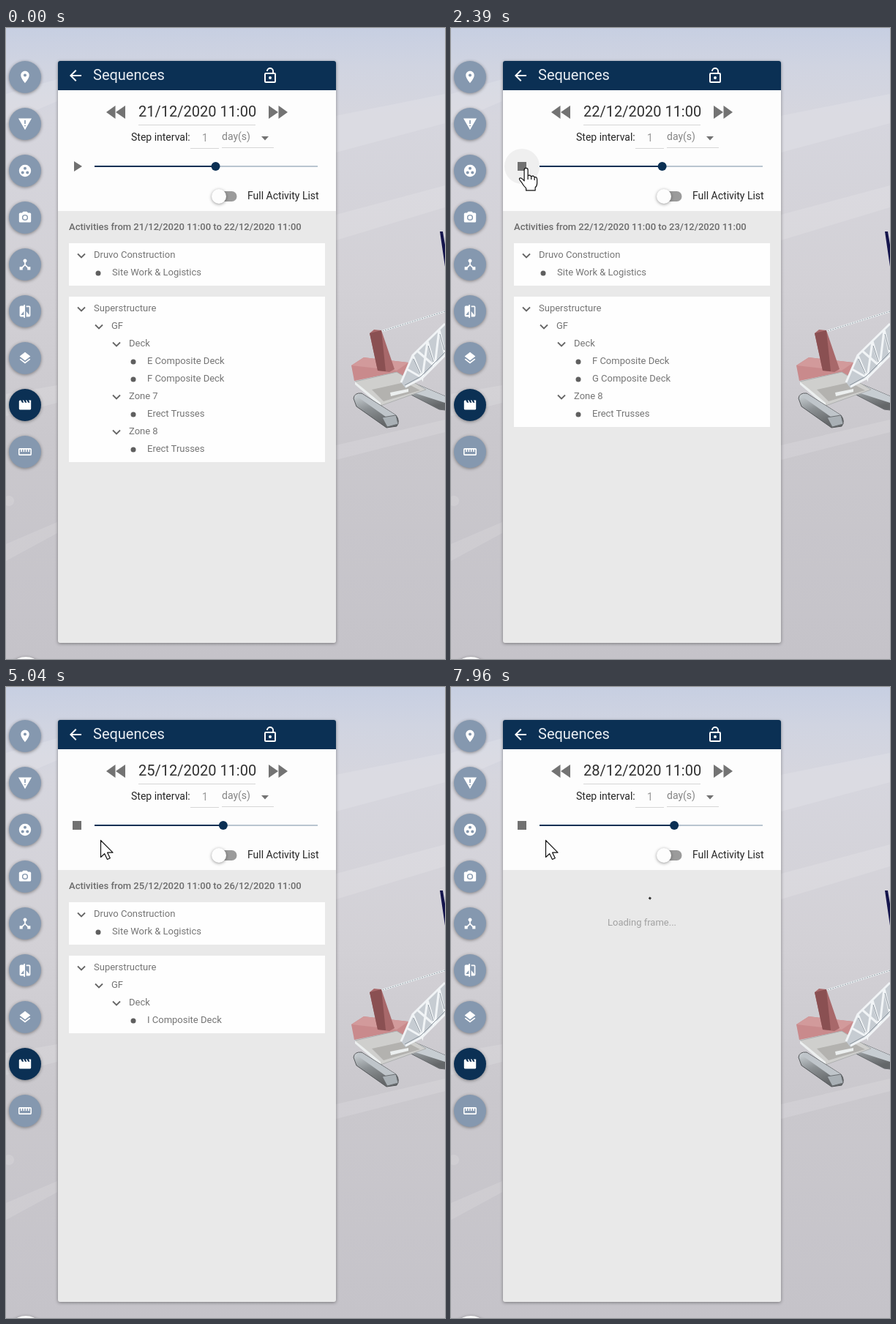
Animation, 600 px wide and 862 px high, one loop 8000 ms. Source, as an HTML page:

```html
<!DOCTYPE html>
<html lang="en">
<head>
<meta charset="utf-8">
<title>Sequences</title>
<style>
  html, body { margin: 0; width: 100%; height: 100%; overflow: hidden; }
  svg { display: block; width: 100vw; height: 100vh; font-family: Roboto, Arial, sans-serif; }
  .lift { filter: drop-shadow(0 1px 2px rgba(0, 0, 0, .4)); }
</style>
</head>
<body>
<svg viewBox="0 0 600 862">
  <defs>
    <linearGradient id="sky" x2="0" y2="1">
      <stop offset="0" stop-color="#c7cfe2"/>
      <stop offset=".06" stop-color="#d0d4e1"/>
      <stop offset=".14" stop-color="#d6d6de"/>
      <stop offset=".4" stop-color="#d3d1d6"/>
      <stop offset=".65" stop-color="#cac8cd"/>
      <stop offset="1" stop-color="#c5c3c9"/>
    </linearGradient>
    <linearGradient id="track" x2=".4" y2="1">
      <stop offset="0" stop-color="#d3d9dd"/>
      <stop offset=".5" stop-color="#8b9093"/>
      <stop offset="1" stop-color="#646769"/>
    </linearGradient>
  </defs>
  <rect width="600" height="862" fill="url(#sky)"/>
  <g fill="#fff" opacity=".13">
    <path d="M0 90L70 70V100L0 130zM0 500L70 488V512L0 530zM0 705L70 675V690L0 728z"/>
    <path d="M451 120L600 90V130L451 170zM451 255L600 215V245L451 290zM451 570L600 535V552L451 590z"/>
    <circle cx="4" cy="646" r="7"/>
  </g>

  <!-- crane -->
  <path d="M593 278h4l3 18v30z" fill="#14144c"/>
  <path d="M508 416L600 387" stroke="#eef2f4" stroke-width="2.2"/>
  <path d="M508 416L600 387" stroke="#8f9ca4" stroke-dasharray="2 1.5"/>
  <path d="M472 461L489 450 550 457 548 477 520 473 476 482z" fill="#c98a8c"/>
  <path d="M472 461L489 450 550 457 534 468z" fill="#d29a9b"/>
  <path d="M497 417L503 412 513 413 531 466 524 470 508 468z" fill="#a8686a"/>
  <path d="M497 417L513 413 519 469 508 468z" fill="#8a5052"/>
  <path d="M546 497L560 486 600 503V522L592 521z" fill="url(#track)" stroke="#66696c"/>
  <path d="M547 495L560 486 600 503V512z" fill="#c7cdd2"/>
  <path d="M477 483L534 470 574 494 512 516z" fill="#cfcfcd" stroke="#aeb0b0"/>
  <path d="M500 494L545 484 566 495 516 510z" fill="#b3b2af"/>
  <path d="M477 483L512 512V517L477 487zM525 498L550 493V497L526 503z" fill="#ecefef"/>
  <path d="M475 506Q476 498 486 499L533 529Q539 537 534 544L520 546 479 517z" fill="url(#track)" stroke="#55585b"/>
  <path d="M478 502L487 500 533 529 523 534z" fill="#bfc5ca"/>
  <path d="M514 532L533 529 536 541 521 545z" fill="#a9b0b5" stroke="#6b6f72"/>
  <path d="M540 484L556 447 600 404V448L569 479 546 492z" fill="#c6ccd2"/>
  <path d="M540 484L556 447 600 404M546 490L569 478 600 447M556 447L569 478 576 428 586 462 592 412 600 446M548 466L569 478M562 441L586 462" fill="none" stroke="#f1f4f6" stroke-width="3"/>
  <path d="M557 452L566 472M577 434L584 456M593 418L599 440M545 488L567 476 600 443" fill="none" stroke="#8b959e"/>

  <g id="tools"></g>
  <circle class="lift" cx="27" cy="887" r="28" fill="#fafafa"/>

  <!-- panel -->
  <g class="lift">
    <rect x="71" y="45" width="380" height="795" rx="3" fill="#e9e9e9"/>
  </g>
  <path d="M71 85V48q0-3 3-3H448q3 0 3 3V85z" fill="#0b3054"/>
  <path d="M71 85H451V250H71z" fill="#fdfdfd"/>
  <g id="head" fill="#fff"></g>
  <path d="M137 115L149.500 106V124zM150 115L163 106V124zM385 115L372.500 106V124zM372 115L359 106V124zM349 148H359L354 153.500z" fill="#737373"/>
  <path d="M181 132.500H341M252 164.500H291M295 163.500H366" stroke="#d6d6d6"/>
  <g id="labels"></g>
  <rect x="284" y="223" width="31.500" height="14" rx="7" fill="#9b9b9b"/>
  <circle class="lift" cx="291" cy="230" r="10" fill="#fdfdfd"/>
  <path d="M121 189H426" stroke="#b9c5d0" stroke-width="2"/>
  <path id="done" stroke="#0b3054" stroke-width="2"/>
  <circle id="thumb" cy="189" r="6" fill="#0b3054"/>
  <circle id="ripple" cx="97" cy="189" fill="#e6e6e6"/>
  <path id="play" fill="#717171"/>
  <g id="list"></g>
  <g id="wait">
    <text x="214" y="326" font-size="13" fill="#a2a2a2">Loading frame...</text>
    <rect id="spin" x="273" width="3" fill="#333"/>
  </g>
  <g id="mouse" fill="#fff" stroke="#111" stroke-width="1.200" stroke-linejoin="round">
    <path id="arrow" d="M.5 .5V23.500L5.700 18.700 9.500 26.500 13.300 24.700 9.600 17.200H17z"/>
    <path id="hand" d="M-2.500 17V2Q-2.500 -.5 0 -.5T2.500 2V10Q5 8 7 11 10 9 11.500 12 15 11 15 15V20Q15 24 12.500 26V30H0V27Q-4 23-6 19-10 15-9 13.500-7 11.500-2.500 17zM2.500 10V15M7 11V15M11.500 12V16"/>
  </g>
</svg>
<script>
const $ = id => document.getElementById(id);
const text = (x, y, size, fill, str, weight = 400) =>
  `<text x="${x}" y="${y}" font-size="${size}" fill="${fill}" font-weight="${weight}">${str}</text>`;
const icon = (x, y, scale, d) =>
  `<path transform="translate(${x} ${y}) scale(${scale}) translate(-12 -12)" fill-rule="evenodd" d="${d}"/>`;
const dot = (x, y, r) => `M${x - r} ${y}a${r} ${r} 0 1 0 ${2 * r} 0a${r} ${r} 0 1 0 ${-2 * r} 0z`;

const toolIcons = [
  'M12 2C8.130 2 5 5.130 5 9c0 5.250 7 13 7 13s7-7.750 7-13c0-3.870-3.130-7-7-7z' + dot(12, 9, 2.5),
  'M1 3H23L12 22zM11 6V12H13V6zM11 14V16H13V14z',
  dot(12, 12, 10) + dot(8, 15, 2.5) + dot(12, 8, 2.5) + dot(16, 15, 2.5),
  'M9 2L7 4H4Q2 4 2 6V18Q2 20 4 20H20Q22 20 22 18V6Q22 4 20 4H17L15 2z' + dot(12, 12, 5) + dot(12, 12, 3.2),
  'M17 16l-4-4V8.820A3 3 0 1 0 11 8.820V12l-4 4H3v5h5v-3.050l4-4.200 4 4.200V21h5v-5z',
  'M10 3H5Q3 3 3 5V19Q3 21 5 21H10V23H12V1H10zM10 18H5L10 12zM19 3H14V5H19V18L14 12V21H19Q21 21 21 19V5Q21 3 19 3z',
  'M12 18.500L4.600 12.800 3 14.100 12 21 21 14.100 19.400 12.800zM12 16L21 9 12 2 3 9z',
  'M18 4l2 4h-3l-2-4h-2l2 4h-3l-2-4H8l2 4H7L5 4H4Q2 4 2 6V18Q2 20 4 20H20Q22 20 22 18V4z',
  'M21 6H3Q1 6 1 8V16Q1 18 3 18H21Q23 18 23 16V8Q23 6 21 6zM21 16H3V8H5V12H7V8H9V12H11V8H13V12H15V8H17V12H19V8H21z'
];
$('tools').innerHTML = toolIcons.map((d, i) => {
  const y = 67 + 64 * i;
  return `<circle class="lift" cx="26" cy="${y}" r="22" fill="${i == 7 ? '#0b3054' : '#8598af'}"/>` +
    `<g fill="#fff">${icon(26, y, .82, d)}</g>`;
}).join('');

$('head').innerHTML =
  icon(95, 65, 1, 'M20 11H7.830L13.420 5.410 12 4 4 12 12 20 13.410 18.590 7.830 13H20z') +
  icon(361, 65, 1, 'M18 8H17V6A5 5 0 0 0 7 6H8.900A3.100 3.100 0 0 1 15.100 6V8H6Q4 8 4 10V20Q4 22 6 22H18Q20 22 20 20V10Q20 8 18 8zM18 20H6V10H18z' + dot(12, 15, 2)) +
  text(119, 71, 20, '#e9eef3', 'Sequences');
$('labels').innerHTML =
  '<text id="date" x="181" y="121" font-size="20" fill="#303030"></text>' +
  text(171, 154, 14, '#262626', 'Step interval:') + text(268, 155, 14, '#9a9a9a', '1') +
  text(295, 153, 14, '#858585', 'day(s)') + text(330, 234, 14, '#262626', 'Full Activity List');

// Each row: depth digit, then its label.
const general = '0Druvo Construction|1Site Work &amp; Logistics';
const deck = '0Superstructure|1GF|2Deck';
const leaf = s => `|3${s} Composite Deck`;
const zone = n => `|2Zone ${n}|3Erect Trusses`;
const plans = {
  21: deck + leaf('E') + leaf('F') + zone(7) + zone(8),
  22: deck + leaf('F') + leaf('G') + zone(8),
  23: deck + leaf('G') + leaf('H'),
  24: deck + leaf('H') + leaf('I'),
  25: deck + leaf('I'),
  26: '0Superstructure|1GF',
  27: '0Superstructure|1GF|1F'.replace('|1F', '|11F') + '|2Zone 1|3Erect Beams'
};
const stamp = day => day + '/12/2020 11:00';

function card(top, plan) {
  const rows = plan.split('|');
  return `<rect x="86" y="${top}" width="350" height="${10 + 24 * rows.length}" fill="#fefefe"/>` +
    rows.map((row, i) => {
      const depth = +row[0], x = 24 * depth, y = top + 20 + 24 * i;
      const open = i + 1 < rows.length && +rows[i + 1][0] > depth;
      const mark = open
        ? `<path d="M${98 + x} ${y - 5.500}l5 5 5-5" fill="none" stroke="#666" stroke-width="1.800"/>`
        : `<circle cx="${102 + x}" cy="${y - 3}" r="3.500" fill="#5f5f5f"/>`;
      return mark + text(120 + x + (open ? 0 : 1), y, 13, '#757575', row.slice(1));
    }).join('');
}

function showList(day) {
  $('list').innerHTML =
    text(86, 276, 13, '#6c6c6c', `Activities from ${stamp(day)} to ${stamp(day + 1)}`, 500) +
    card(294, general) + card(367, plans[day]);
}

// Day change: start, list ready, spinner start angle.
const changes = [[1930, 2110, 0], [2930, 3090, 17], [3930, 4060, 0], [4910, 5040, 0],
  [5910, 6010, 0], [6890, 7040, 0], [7880, 8040, 0]];
const clamp = v => Math.max(0, Math.min(1, v));
const mix = (a, b, k) => a + (b - a) * k;
const ease = k => k * k * (3 - 2 * k);
let shown;

function draw(t) {
  const n = changes.filter(c => t >= c[0]).length, day = 21 + n;
  const [start, ready, angle] = changes[n - 1] || [0, 0, 0];
  const busy = t < ready, loading = busy && day != 24;
  const listDay = busy ? day - 1 : day;
  if (shown != listDay) showList(shown = listDay);
  $('list').style.display = loading ? 'none' : '';
  $('wait').style.display = loading ? '' : 'none';
  const size = 1 + (t - start) * .025;
  $('spin').setAttribute('height', size);
  $('spin').setAttribute('y', 280.500 - size / 2);
  $('spin').setAttribute('transform', `rotate(${angle + (t - start) * .45} 261 280.5)`);
  $('date').textContent = stamp(day);

  const x = t < 1980 ? 286.500 : 285.900 + 2.750 * n;
  $('thumb').setAttribute('cx', x);
  $('done').setAttribute('d', `M121 189H${x}`);
  $('play').setAttribute('d', t < 860 ? 'M93 182L104 189 93 196z' : 'M91 183H103V195H91z');
  $('ripple').setAttribute('r', t < 860 ? 0 : mix(17, 24, clamp((t - 860) / 100)));
  $('ripple').setAttribute('opacity', 1 - clamp((t - 2290) / 250));

  const inward = ease(clamp((t - 40) / 720)), away = ease(clamp((t - 2290) / 330));
  const mx = mix(mix(522, 95, inward), 129, away), my = mix(mix(822, 187, inward), 209, away);
  const over = Math.hypot(mx - 97, my - 189) < 24;
  $('mouse').style.display = t < 40 ? 'none' : '';
  $('mouse').setAttribute('transform', `translate(${mx} ${my})`);
  $('hand').style.display = over ? '' : 'none';
  $('arrow').style.display = over ? 'none' : '';
}

const begin = performance.now();
function tick() {
  draw((performance.now() - begin) % 8000);
  requestAnimationFrame(tick);
}
tick();
</script>
</body>
</html>
```
